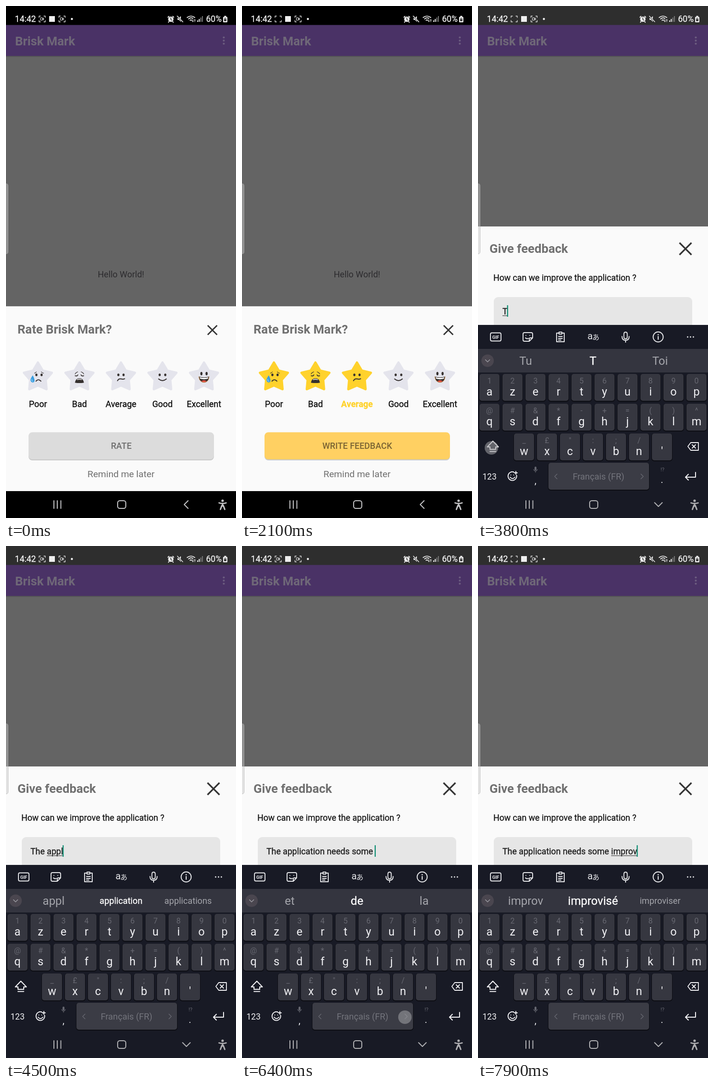
These frames come from a looping animation (480 px wide and 1066 px high, 8 s). An HTML page:

```html
<!DOCTYPE html>
<html lang="en">
<head>
<meta charset="utf-8">
<title>Rating dialog</title>
<style>
html, body { margin: 0; width: 100%; height: 100%; overflow: hidden; background: #000; }
svg { display: block; width: 100%; height: 100%; font-family: Roboto, sans-serif; }
text { white-space: pre; }
.mid { text-anchor: middle; }
.line { fill: none; stroke-linecap: round; stroke-linejoin: round; }
.firm { stroke: currentColor; stroke-width: .3; }
</style>
</head>
<body>
<svg id="stage" viewBox="0 0 480 1066"></svg>
<script>
const LOOP = 8000, STEP = 100;
const PICK = 1100, SWITCH = 2200, TYPE = 3500, UNSHIFT = 3800;
const MESSAGE = "The application needs some improv";
const NAME = "Brisk Mark";
const BODY = 17.97, FIELD = 17.77, HEAD = 25.67;

// ---- drawing helpers ----
const text = (x, y, s, size, fill, extra = "") =>
  `<text x="${x}" y="${y}" font-size="${size}" fill="${fill}" ${extra}>${s}</text>`;
const label = (x, y, s, size, fill, extra = "") =>
  `<text text-anchor="middle" x="${x}" y="${y}" font-size="${size}" fill="${fill}" ${extra}>${s}</text>`;
const firm = color => `class="firm" color="${color}"`;
const rect = (x, y, w, h, fill, rx = 0, extra = "") =>
  `<rect x="${x}" y="${y}" width="${w}" height="${h}" rx="${rx}" fill="${fill}" ${extra}/>`;
const dot = (x, y, r, fill, extra = "") =>
  `<circle cx="${x}" cy="${y}" r="${r}" fill="${fill}" ${extra}/>`;
const line = (d, color, w = 2, extra = "") =>
  `<path class="line" d="${d}" stroke="${color}" stroke-width="${w}" ${extra}/>`;
const fill = (d, color) => `<path d="${d}" fill="${color}"/>`;
const at = (x, y, inner) => `<g transform="translate(${x} ${y})">${inner}</g>`;
const cross = (x, y, r, w) =>
  line(`M${x - r} ${y - r}L${x + r} ${y + r}M${x + r} ${y - r}L${x - r} ${y + r}`, "#343434", w, 'style="stroke-linecap:butt"');

// ---- status bar ----
const frameIcon = x => at(x, 27, line("M-6.500-3V-6H-3.500M3.500-6H6.500V-3M6.500 3V6H3.500M-3.500 6H-6.500V3", "#ddd", 1.3));
const camera = x => line(`M${x - 3} 24.500h4v5h-4zM${x + 1} 26.500l2.500-1.500v4l-2.500-1.500`, "#ddd", 1.1);

function statusBar() {
  const w = "#eee";
  return rect(0, 0, 480, 39.5, "#000", 0, 'id="status"') +
    text(18.5, 33.2, "14:42", 17.7, "#f4f4f4", firm("#f4f4f4")) +
    frameIcon(75.5) + `<g id="blink">${camera(75)}</g>` +
    rect(90, 21, 12, 12, w) +
    frameIcon(117) + camera(116.5) + dot(137.5, 27, 2.2, w) +
    at(344, 27.5, dot(0, 0, 5.6, w) + line("M-6-4L-4-6M6-4L4-6M-4 5L-5 6.500M4 5L5 6.500", w, 1.8) + line("M0-3V.5L2 2", "#222", 1.3)) +
    at(363, 27, fill("M-5-2H-2L2-6V6L-2 2H-5Z", w) + line("M-6-6L6 6", "#222", 3) + line("M-5.500-6L6 6", w, 1.5)) +
    at(386, 27, line("M-8-3Q0-9 8-3M-5 0Q0-4 4-1M-2 3Q0 1 2 3", w, 1.7) + line("M4 1V6M2.500 4.500L4 6L5.500 4.500M8 6V1M6.500 2.500L8 1L9.500 2.500", w, 1)) +
    at(399, 33, rect(0, -3, 2, 3, w) + rect(3.3, -6, 2, 6, w) + rect(6.6, -9, 2, 9, "#777") + rect(9.9, -12, 2, 12, "#777")) +
    text(417.5, 33.2, "60%", 17.5, "#f4f4f4", firm("#f4f4f4")) +
    at(457.5, 27.5, rect(-4.5, -5, 9, 11.5, w, 1.5) + rect(-2, -7, 4, 3, w) + line("M-1.500 1V-1.500Q0-3.500 1.500-1.500V1", "#333", 1.1) + rect(-2.5, 0, 5, 4, "#333"));
}

// ---- rating sheet ----
function starPath(R, r) {
  let d = "";
  for (let i = 0; i < 10; i++) {
    const a = i * Math.PI / 5, q = i % 2 ? r : R;
    d += (i ? "L" : "M") + (q * Math.sin(a)).toFixed(2) + " " + (-q * Math.cos(a)).toFixed(2);
  }
  return d + "Z";
}
const INK = "#35302f";
const eyes = (x1, x2, y, rx = 2.5, ry = 3) =>
  [x1, x2].map(x => `<ellipse cx="${x}" cy="${y}" rx="${rx}" ry="${ry}" fill="${INK}"/>`).join("");
const FACES = [
  ["Poor", eyes(-3.5, 8.5, -5) +
    line("M-8-9Q-5-10-3.500-12M8-12Q10-9 13-9", INK, 1.2) +
    line("M-4.500 9.500Q1 3 7 9.500", INK, 2.2) +
    fill("M-12-4Q-18 4-17 8Q-15.500 13-11.500 12.500Q-7 12-8 6Q-9 1-12-4Z", "#3a9ee0") +
    line("M-14 5Q-15 9-11.500 10", "#a9dcf7", 1.3)],
  ["Bad", line("M-10-7Q-9-10-4-12M10-7Q9-10 4-12", INK, 1.3) +
    line("M-10-3Q-6-1-3.500-5M10-3Q6-1 3.500-5", INK, 1.8) +
    fill("M-10.500 13Q-9 3 0 3Q9 3 10.500 13Q0 15-10.500 13Z", INK) +
    line("M-5 6Q0 4.500 5 6", "#fff", 1.6)],
  ["Average", eyes(-6, 6, -5) + line("M-8 8.500Q-5 3 1 4.500Q5 5.500 8.500 4", INK, 2.2)],
  ["Good", eyes(-6.5, 6.5, -5) + line("M-9 4.500Q0 12 9 4.500", INK, 2.2)],
  ["Excellent", eyes(-6, 6, -8, 2.5, 4) +
    fill("M-12-1Q0 2.500 12-1Q11 12 0 12.500Q-11 12-12-1Z", INK) +
    fill("M-10 .5Q0 3.500 10 .5L9 4Q0 6.500-9 4Z", "#fff") +
    fill("M-6 9.500Q0 5.500 6 9.500Q0 14-6 9.500Z", "#ee5547") +
    line("M-12-1Q-11 12 0 12.500Q11 12 12-1", "#d88a3a", .9)]
];

function ratingSheet() {
  const star = starPath(30.5, 17);
  const items = FACES.map(([name, face], i) => {
    const x = 66.6 + i * 86.65;
    return at(x, 773, `<path class="star" d="${star}" stroke-width="5" stroke-linejoin="round"/>` +
        `<g transform="translate(0 -.5) scale(.9)">${face}</g>`) +
      label(x, 835, name, BODY, "#0a0a0a", 'data-rate ' + firm("#0a0a0a"));
  }).join("");
  return `<g id="rating">` + rect(0, 625.2, 480, 400, "#fafafa") +
    text(24, 682, `Rate ${NAME}?`, HEAD, "#707070", 'font-weight="700"') +
    cross(430.7, 674.7, 9.8, 2.8) + items +
    rect(47, 889, 387, 57, "#c9c9c9", 8) +
    rect(47, 887.5, 387, 56.5, "#dcdcdc", 8, 'id="button"') +
    label(240.5, 922, "RATE", BODY, "#6e6e6e", 'id="action" font-weight="500"') +
    label(240, 981, "Remind me later", 19.25, "#6f6f6f") + `</g>`;
}

// ---- feedback sheet ----
const feedbackSheet = () => `<g id="feedback">` +
  rect(0, 459, 480, 620, "#fafafa") +
  text(24, 514, "Give feedback", HEAD, "#707070", 'font-weight="700"') +
  cross(433, 505.5, 12.5, 3.3) +
  text(32, 571.5, "How can we improve the application ?", FIELD, "#151515", firm("#151515")) +
  rect(33, 606, 414, 180, "#e6e6e6", 9) +
  text(51, 642, "", FIELD, "#1a1a1a", 'id="typed" ' + firm("#1a1a1a")) +
  rect(51, 644.2, 0, 1.2, "#444", 0, 'id="under"') +
  rect(50, 623, 2.2, 24, "#0c8d72", 0, 'id="caret"') + `</g>`;

// ---- keyboard, drawn at its resting place ----
const ROWS = [
  [3, 766, "azertyuiop", "1234567890"],
  [3, 828, "qsdfghjklm", "@#&*-+=()^"],
  [75, 890, "wxcvbn'", "_£\":;/ "]
];
const esc = c => c === "&" ? "&amp;" : c;

function toolbar() {
  const w = "#e4e5e8", y = 689, s = (x, d, k = 1.9) => at(x, y, line(d, w, k));
  return at(37, y, `<rect x="-11" y="-8.500" width="22" height="17" rx="3" fill="none" stroke="${w}" stroke-width="1.900"/>` +
      label(0, 3.8, "GIF", 9.5, w, 'font-weight="700"')) +
    s(104, "M-7-9H7Q10-9 10-6V2L3 9H-7Q-10 9-10 6V-6Q-10-9-7-9ZM10 2H5Q3 2 3 4V9M-4-3v.1M4-3v.1M-5 2Q-2 5 1 3") +
    s(172, "M-3-8H-8V10H8V-8H3M-3-10H3V-6H-3ZM-4-1H4M-4 3H4M-4 6.500H1") +
    at(240, y, label(-6, 5, "a", 20, w) + label(6, 6, "あ", 15, w, 'font-family="Noto Sans CJK JP, Noto Sans CJK, sans-serif" font-weight="500"')) +
    s(308, "M-3.500-6Q-3.500-10 0-10Q3.500-10 3.500-6V0Q3.500 4 0 4Q-3.500 4-3.500 0ZM-7.500-1Q-7.500 7 0 7Q7.500 7 7.500-1M0 7V11") +
    at(376, y, `<circle r="10.500" fill="none" stroke="${w}" stroke-width="1.900"/>` + line("M0-1V5", w) + dot(0, -4.8, 1.3, w)) +
    [437.5, 443.5, 449.5].map(x => dot(x, y, 1.5, w)).join("");
}

function keyboard() {
  const w = "#f0f0f3", dim = "#666770", low = "#73747c";
  const keys = ROWS.map(([x0, y, letters, hints]) => [...letters].map((c, i) => {
    const x = x0 + i * 48;
    return rect(x - 1, y, 44, 58, "#0d0e14", 6) + rect(x, y, 42, 56, "#363740", 5) +
      label(x + 21, y + 20, esc(hints[i]), 16, dim) +
      label(x + 21, y + 45, c, 23.5, w, 'data-key');
  }).join("")).join("");
  return `<g id="keys">` + rect(0, 664, 480, 480, "#181a25") + toolbar() +
    rect(0, 714, 480, 49, "#34353f") +
    dot(20, 738.5, 13, "#4a464f") + line("M15.500 736.500L20 741L24.500 736.500", "#9a9aa0", 1.5) +
    [99.5, 240, 380].map((x, i) => {
      const c = i === 1 ? "#fff" : "#a4a5ab";
      return label(x, 747, "", 24, c, 'data-hint ' + (i === 1 ? firm(c) : ""));
    }).join("") +
    keys +
    at(31, 917, line("M0-11L11.500 1H6V6H-6V1H-11.500ZM-6 10.500H6", w, 2)) +
    at(449, 917, line("M-11 0L-5-8H11V8H-5ZM-2-3.500L5 3.500M5-3.500L-2 3.500", w, 1.8)) +
    label(24, 985.5, "123", 17.5, w) +
    at(72, 979, line("M3-8.500A9 9 0 1 0 8.500-2M-5 2Q0 8 5 2M-3.500-2.500v.1M2.500-2.500v.1M7-10V-4M4-7H10", w, 1.9)) +
    at(120, 965, rect(-2, -6, 4, 8, dim, 2) + line("M-4 0Q0 7 4 0M0 4V6", dim, 1.2)) +
    label(120, 995, ",", 20, w) +
    rect(146, 951, 212, 58, "#0d0e14", 6) + rect(147, 951, 210, 56, "#3b3c45", 5) +
    label(251.5, 985.5, "Français (FR)", 18.3, low) +
    line("M165 974.500L160 979.500L165 984.500M340 974.500L345 979.500L340 984.500", dim, 1.3) +
    label(385, 969, "!?", 11, dim) + label(384, 993, ".", 20, w) +
    at(443, 979, line("M11-8V2H-9M-4-4L-10 2L-4 8", w, 2)) + `</g>`;
}

// ---- navigation icons ----
const navIcons = () => `<g id="nav" stroke="#c4c4c6">` +
  `<path class="line" d="M100 1030V1046M107 1030V1046M114.500 1030V1046" stroke-width="2"/>` +
  `<rect x="233" y="1030" width="17" height="16" rx="4.500" fill="none" stroke-width="2"/>` +
  `<path id="back" class="line" stroke-width="2"/>` +
  at(452, 1038, dot(0, -8, 2.6, "#c4c4c6", 'stroke="none"') +
    `<path class="line" d="M-7.500-3.500Q0-1 7.500-3.500" stroke-width="2.600"/>` +
    `<path class="line" d="M0-2V3M-1.500 2L-4.500 10M1.500 2L4.500 10" stroke-width="3"/>`) + `</g>`;

const svg = document.getElementById("stage");
svg.innerHTML = rect(0, 0, 480, 1066, "#646464") +
  rect(0, 104, 480, 2, "#565656") + rect(0, 39, 480, 65, "#4a3266") +
  text(19, 81.5, NAME, HEAD, "#6f6878", 'font-weight="700"') +
  [65.5, 72, 78.5].map(y => dot(454.5, y, 2.1, "#6c5c80")).join("") +
  label(240, 564.5, "Hello World!", BODY, "#2c2b2e") +
  ratingSheet() + feedbackSheet() + rect(0, 1010, 480, 56, "#000") + keyboard() +
  `<path d="M-2 370H1Q4.500 370 4.500 375V511Q4.500 516 1 516H-2Z" fill="#c8c8c8" fill-opacity=".45" stroke="#a8a8a8" stroke-opacity=".6"/>` +
  navIcons() + statusBar() + dot(0, 0, 14, "#a2a2a6", 'id="touch" opacity=".55"');

const $ = id => document.getElementById(id);
const all = q => [...svg.querySelectorAll(q)];
const stars = all(".star"), rates = all("[data-rate]"), keyTexts = all("[data-key]"), hints = all("[data-hint]");
const letters = keyTexts.map(k => k.textContent);
const pen = document.createElement("canvas").getContext("2d");
const width = s => { pen.font = FIELD + "px Roboto, sans-serif"; return pen.measureText(s).width; };
const set = (el, o) => { for (const k in o) el.setAttribute(k, o[k]); };
const show = (el, on) => set(el, { display: on ? "inline" : "none" });
const slide = (el, y) => set(el, { transform: `translate(0 ${y.toFixed(2)})` });
const clamp = v => Math.max(0, Math.min(1, v));
const rest = (t, start, span) => (1 - clamp((t - start) / span)) ** 3;

// time and number of letters typed
const PACE = [[TYPE, 1], [3900, 1], [5250, 17], [6350, 27], [6700, 27], [7800, 33]];
function typedCount(t) {
  if (t < TYPE) return 0;
  for (let i = 1; i < PACE.length; i++) {
    const [a, n] = PACE[i - 1], [b, m] = PACE[i];
    if (t < b) return Math.floor(n + (m - n) * (t - a) / (b - a));
  }
  return MESSAGE.length;
}

const GUESS = {
  T: "Tu T Toi", Th: "Thé Th Théâtre", The: "Thé The Thème",
  a: "au a avec", ap: "après ap appel", n: "numéro n numérique", ne: "ne neuf nez",
  s: "sur s suis", so: "son so sont", i: "il i ils", im: "image im images", improv: "improv improvisé improviser"
};
function guesses(s, word) {
  if (!s) return ["Wa", "O", "Ok"];
  if (!word) return ["et", "de", "la"];
  if (GUESS[word]) return GUESS[word].split(" ");
  if (word.startsWith("app")) return [word, "application", "applications"];
  if (word.startsWith("imp")) return [word, "important", "impossible"];
  return [word, word + "s", word + "e"];
}

function draw(t) {
  const picked = t >= PICK, feedback = t >= SWITCH;
  stars.forEach((s, i) => {
    const c = picked && i < 3 ? "#ffd22c" : "#e4e4ec";
    set(s, { fill: c, stroke: c });
  });
  const ink = picked ? "#ffd22c" : "#0a0a0a";
  set(rates[2], { fill: ink, color: ink, "font-weight": picked ? 700 : 400 });
  set($("button"), { fill: picked ? "#ffd062" : "#dcdcdc" });
  set($("action"), { fill: picked ? "#7a6433" : "#6e6e6e" });
  $("action").textContent = picked ? "WRITE FEEDBACK" : "RATE";

  slide($("rating"), 400 * clamp((t - 2150) / 200) ** 2);
  slide($("feedback"), 607 * rest(t, SWITCH, 407));
  slide($("keys"), 402 * rest(t, 2300, 440));
  show($("rating"), t < 2400);
  show($("feedback"), feedback);
  show($("keys"), feedback);
  set($("status"), { fill: feedback ? "#2e2e2e" : "#000" });
  set($("back"), { d: feedback ? "M368.500 1034L376.500 1042L384.500 1034" : "M380 1030L372 1038L380 1046" });
  set($("nav"), { opacity: feedback ? .88 : 1 });

  const n = typedCount(t), s = MESSAGE.slice(0, n);
  const word = s.slice(s.lastIndexOf(" ") + 1), w = width(s), part = width(word);
  $("typed").textContent = s;
  set($("under"), { x: 51 + w - part, width: part });
  set($("caret"), { x: 50 + w });
  show($("caret"), n || (t + 500) % 1000 < 500);
  guesses(s, word).forEach((g, i) => {
    const small = g.length > (i === 1 ? 9 : 8);
    hints[i].textContent = g;
    set(hints[i], { "font-size": small ? 18.2 : 24, y: small ? 744.5 : 747 });
  });
  keyTexts.forEach((k, i) => k.textContent = t < UNSHIFT ? letters[i].toUpperCase() : letters[i]);

  const shift = t >= 3700 && t < 3900;
  const space = s.endsWith(" ") && typedCount(t - STEP) < n;
  show($("touch"), shift || space);
  set($("touch"), { cx: shift ? 28 : 340, cy: shift ? 920 : 981 });
  show($("blink"), t < 100 || (t % 2000 >= 200 && t % 2000 < 1200));
}

const begin = performance.now();
function tick(now) {
  const t = Math.max(0, now - begin) % LOOP;
  draw(Math.floor(t / STEP) * STEP);
  requestAnimationFrame(tick);
}
draw(0);
requestAnimationFrame(tick);
</script>
</body>
</html>
```
